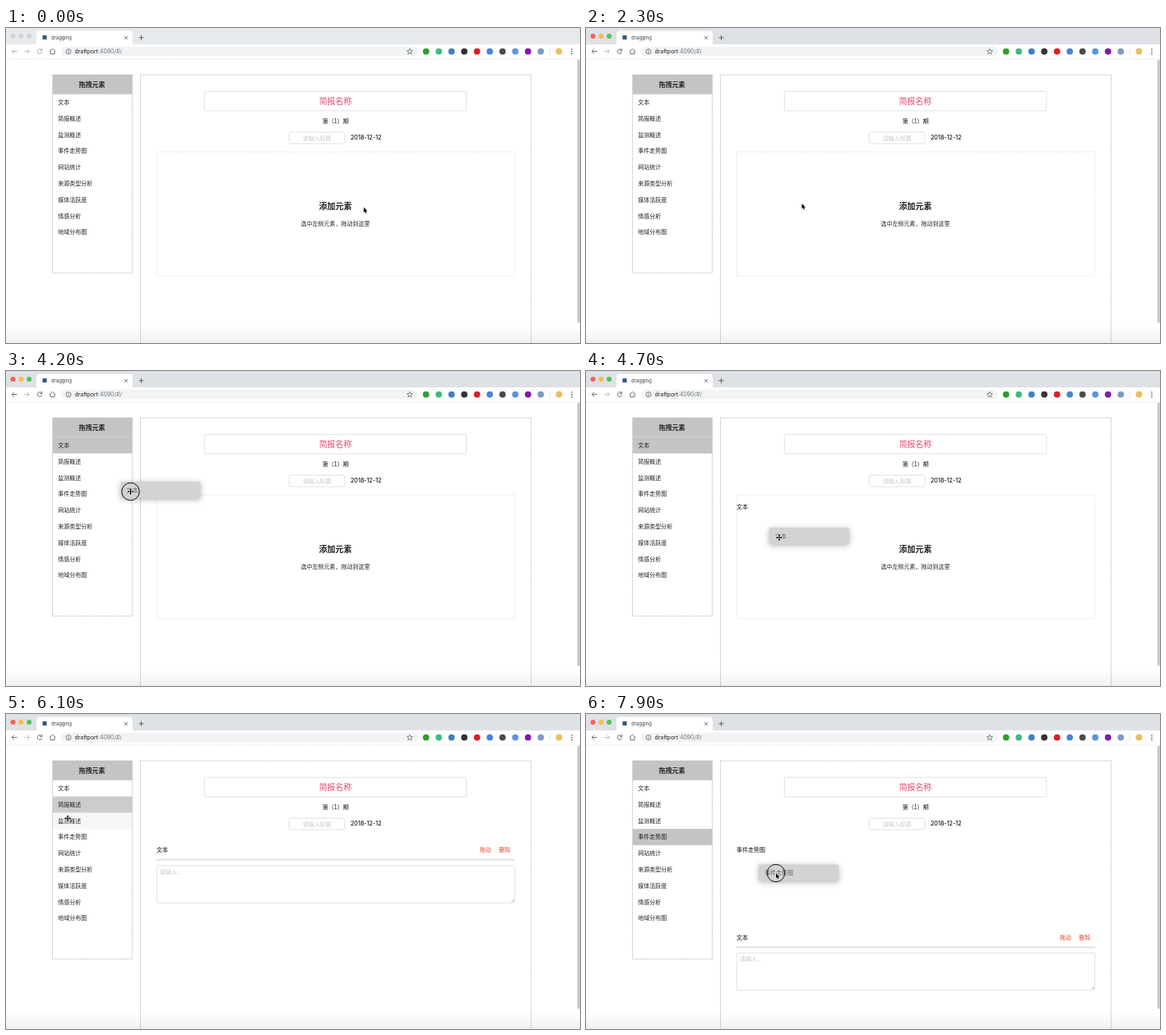
These frames come from a looping animation (698 px wide and 384 px high, 8 s). An HTML page with a canvas:

```html
<!DOCTYPE html>
<html lang="zh-CN">
<head>
<meta charset="utf-8">
<title>dragging</title>
<style>
  html, body { margin: 0; width: 100%; height: 100%; overflow: hidden; background: #fff; }
  canvas { display: block; width: 698px; height: 384px; }
</style>
</head>
<body>
<canvas id="stage"></canvas>
<script>
const W = 698, H = 384, LOOP = 8000, STEP = 100;
const LATIN = 'Inter, sans-serif';
const HAN = '"Noto Sans CJK SC", "Noto Sans CJK", sans-serif';
const GREY = '#c4c4c4', INK = '#5f6368', EDGE = '#b9b9b9', FIELD = '#dedede';
const ROWS = ['文本', '简报概述', '监测概述', '事件走势图', '网站统计',
  '来源类型分析', '媒体活跃度', '情感分析', '地域分布图'];
const ROW_TOP = 80.7, ROW_H = 19.8;

const FOCUS = 1400, DROP = 4900, INSERT = 7800, SHIFT = 106.5;
const ENTER = [3300, 5150, 6050, 6250];  // when each row is hovered
const FADE = 350;
const HELD = [[1300, 2300], [3600, 4600], [7100, LOOP]];

// Pointer moves: from, to, x, y, lift
const HOME = { x: 435, y: 218.5 };
const MOVES = [
  [0, 200, 68, 94], [400, 850, 440, 172], [850, 1300, 72, 92],
  [FOCUS, 2100, 262.5, 214], [2400, 2800, 21, 74], [2800, 3100, 66, 80],
  [3200, 3300, 68, 91], [3700, 4700, 235, 203], [4800, 5000, 62, 90],
  [5000, 5300, 64, 108.7], [5300, 5900, 74, 116], [6000, 6300, 77, 150],
  [7400, 7900, 231, 194, 60]
];

const canvas = document.getElementById('stage');
const ctx = canvas.getContext('2d');
const ratio = window.devicePixelRatio || 1;
canvas.width = W * ratio;
canvas.height = H * ratio;

const clamp = v => Math.max(0, Math.min(1, v));
const within = (t, a, b) => t >= a && t < b;

function pointerAt(t) {
  let { x, y } = HOME;
  for (const [from, to, toX, toY, lift = 0] of MOVES) {
    const p = clamp((t - from) / (to - from));
    x += (toX - x) * p;
    y += (toY - y) * p - lift * Math.sin(Math.PI * p);
  }
  return { x, y };
}

function rect(x, y, w, h, color) {
  ctx.fillStyle = color;
  ctx.fillRect(x, y, w, h);
}

function roundBox(x, y, w, h, r, fill, stroke) {
  ctx.beginPath();
  ctx.roundRect(x, y, w, h, r);
  if (fill) { ctx.fillStyle = fill; ctx.fill(); }
  if (stroke) { ctx.strokeStyle = stroke; ctx.lineWidth = 0.9; ctx.stroke(); }
}

function dashedBox(x, y, w, h, color) {
  ctx.setLineDash([1.5, 0.9]);
  roundBox(x, y, w, h, 0, null, color);
  ctx.setLineDash([]);
}

function disc(x, y, r, color) {
  ctx.beginPath();
  ctx.arc(x, y, r, 0, Math.PI * 2);
  ctx.fillStyle = color;
  ctx.fill();
}

function ring(x, y, r, color, width, from = 0, to = Math.PI * 2) {
  ctx.beginPath();
  ctx.arc(x, y, r, from, to);
  ctx.strokeStyle = color;
  ctx.lineWidth = width;
  ctx.stroke();
}

function line(color, width, ...pts) {
  ctx.beginPath();
  pts.forEach(([x, y]) => ctx.lineTo(x, y));
  ctx.strokeStyle = color;
  ctx.lineWidth = width;
  ctx.stroke();
}

// y is the visual middle of the glyphs
function text(str, x, y, size, color, { align = 'left', weight = 400, family = HAN } = {}) {
  ctx.font = `${weight} ${size}px ${family}`;
  ctx.textAlign = align;
  ctx.fillStyle = color;
  ctx.fillText(str, x, y + size * 0.37);
}

function drawTabs(focused) {
  const lights = focused ? ['#f2625a', '#f5bd45', '#4fc455'] : Array(3).fill('#d0d3d6');
  rect(0, 0, W, 20, focused ? '#dee1e6' : '#e7eaed');
  lights.forEach((c, i) => disc(8.5 + i * 9.8, 10, 3, c));
  roundBox(37, 3.5, 117, 20, 4, '#fff');
  rect(44.5, 9, 5, 5, '#35577d');
  text('dragging', 55, 11.8, 5.9, '#3c4043', { family: LATIN });
  line(INK, 0.9, [144, 9.8], [148, 13.8]);
  line(INK, 0.9, [148, 9.8], [144, 13.8]);
  line(INK, 1, [161.5, 11.8], [167.5, 11.8]);
  line(INK, 1, [164.5, 8.8], [164.5, 14.8]);
}

function drawNavArrow(x, dir, color) {
  line(color, 0.9, [x - dir * 3.2, 28.5], [x + dir * 3.2, 28.5]);
  line(color, 0.9, [x + dir * 0.3, 25.6], [x + dir * 3.2, 28.5], [x + dir * 0.3, 31.4]);
}

function drawToolbar(focused) {
  const ink = focused ? INK : '#a5a8ac';
  rect(0, 20, W, 18, '#fff');
  drawNavArrow(10.3, -1, ink);
  drawNavArrow(25.2, 1, '#b9bcc0');
  ring(41, 28.5, 2.8, ink, 0.9, 0.3, 5.5);
  line(ink, 1, [43.7, 25.2], [43.7, 27.6], [41.3, 27.6]);
  line(INK, 0.9, [52.8, 28.6], [56.5, 25.3], [60.2, 28.6]);
  line(INK, 0.9, [54, 28], [54, 31.6], [59, 31.6], [59, 28]);

  roundBox(67, 22.7, 434, 11.8, 5.9, '#f1f3f4');
  ring(76, 28.7, 3, INK, 0.8);
  line(INK, 0.8, [76, 28.2], [76, 30.4]);
  line(INK, 0.8, [76, 26.8], [76, 27.6]);
  const host = 'draftport';
  text(host, 83.5, 28.6, 6.9, '#202124', { family: LATIN });
  text(':4090/#/', 83.5 + ctx.measureText(host).width, 28.6, 6.9, '#70757a', { family: LATIN });
  const star = Array.from({ length: 11 }, (_, i) => {
    const a = i * Math.PI / 5 - Math.PI / 2, r = i % 2 ? 1.6 : 3.7;
    return [491 + r * Math.cos(a), 28.8 + r * Math.sin(a)];
  });
  line(INK, 0.7, ...star);

  const badges = ['#2f9e2f', '#41b883', '#3f7fc4', '#333', '#d8202c',
    '#4a83d8', '#4b4b4b', '#5b93e0', '#8517a8', '#7d9cbd'];
  badges.forEach((c, i) => disc(510.8 + i * 15.5, 28.6, 3.9, c));
  line('#d8dade', 0.7, [661.3, 24], [661.3, 33]);
  disc(672.5, 28.6, 4, '#e9bf62');
  for (let i = -1; i <= 1; i++) disc(688, 28.6 + i * 2.8, 0.85, INK);
  ctx.setLineDash([2, 1]);
  line('#dcdcdc', 0.8, [0, 38], [W, 38]);
  ctx.setLineDash([]);
}

function rowLevel(row, t) {
  const from = ENTER[row] ?? LOOP;
  const to = row === 0 ? DROP : ENTER[row + 1] ?? LOOP;
  const rise = clamp((Math.min(t, to) - from) / FADE);
  return clamp(rise - Math.max(0, t - to) / FADE);
}

function drawSidebar(t) {
  rect(57, 57, 96.5, 23.7, GREY);
  text('拖拽元素', 104.5, 69.2, 8, '#222', { align: 'center', weight: 700 });
  ROWS.forEach((name, i) => {
    const y = ROW_TOP + i * ROW_H;
    ctx.globalAlpha = rowLevel(i, t);
    rect(57, y, 96.5, ROW_H, GREY);
    ctx.globalAlpha = 1;
    text(name, 63.3, y + 9.8, 7, '#222');
  });
  dashedBox(56.5, 57, 97, 241.8, EDGE);
}

function drawCard(y) {
  text(ROWS[0], 183, y + 14.5, 7, '#111');
  text('拖动', 576, y + 14.5, 7, '#ea452e');
  text('删除', 599.6, y + 14.5, 7, '#ea452e');
  line('#cacaca', 1, [183, y + 26.8], [619, y + 26.8]);
  roundBox(183.3, y + 33.8, 435.4, 45.4, 1.8, '#fff', FIELD);
  text('请输入...', 187, y + 41, 7, '#c3c3c3');
  for (const d of [1.5, 3.5]) line('#888', 0.6, [618 - d, y + 78], [618, y + 78 - d]);
}

function drawReport(t) {
  const center = { align: 'center' };
  dashedBox(163.5, 57, 475.2, 400, EDGE);
  roundBox(241.3, 77.3, 318.6, 23.6, 1.2, null, FIELD);
  text('简报名称', 400.5, 89.2, 9.9, '#dc4a70', center);
  text('第（1）期', 400.7, 113.6, 7, '#111', center);
  roundBox(344.4, 127, 67.6, 14, 1.6, null, FIELD);
  text('请输入标题', 378.3, 134, 7, '#c8c8c8', center);
  text('2018-12-12', 419, 133.6, 7.1, '#111', { family: LATIN, weight: 500 });

  if (t < DROP) {
    dashedBox(183.3, 151, 435.4, 151, '#e2e2e2');
    text('添加元素', 400.5, 217, 10, '#222', { align: 'center', weight: 700 });
    text('选中左侧元素，拖动到这里', 400.5, 238.4, 7, '#222', center);
    if (t >= 4400) text(ROWS[0], 183, 165.5, 7, '#111');
    return;
  }
  if (t >= INSERT) text(ROWS[3], 183, 165.5, 7, '#111');
  ctx.globalAlpha = clamp((t - DROP + 50) / 250);
  drawCard(t >= INSERT ? 151 + SHIFT : 151);
  ctx.globalAlpha = 1;
}

function drawGhost(label, x, y) {
  ctx.save();
  ctx.shadowColor = 'rgba(0,0,0,.3)';
  ctx.shadowBlur = 7 * ratio;
  ctx.shadowOffsetY = 1.5 * ratio;
  roundBox(x, y, 97, 20, 1, '#d3d3d3');
  ctx.restore();
  text(label, x + 7, y + 10, 7, '#666');
}

function fillShape(pts) {
  ctx.beginPath();
  pts.forEach(([x, y]) => ctx.lineTo(x, y));
  ctx.closePath();
  ctx.strokeStyle = '#fff';
  ctx.lineWidth = 1.1;
  ctx.lineJoin = 'round';
  ctx.stroke();
  ctx.fillStyle = '#000';
  ctx.fill();
}

function drawArrow() {
  fillShape([[0, 0], [0, 6.5], [1.4, 5.1], [2.4, 7.5], [3.5, 7], [2.5, 4.8], [4.5, 4.7]]);
}

function drawMove() {
  const arm = [[-0.5, -0.5], [-0.5, -2.2], [-1.6, -2.2], [0, -4], [1.6, -2.2], [0.5, -2.2]];
  const turn = ([x, y], q) => [[x, y], [-y, x], [-x, -y], [y, -x]][q];
  fillShape([0, 1, 2, 3].flatMap(q => arm.map(p => turn(p, q))));
}

function drawPointer(t, { x, y }) {
  const crossed = within(t, 3300, 4800) || within(t, 5000, 7400);
  if (HELD.some(([a, b]) => within(t, a, b))) {
    ring(x, y, within(t, 7100, 7400) ? 9 : 10.7, '#111', 1);
  }
  ctx.save();
  ctx.translate(x, y);
  if (crossed) drawMove();
  else drawArrow();
  ctx.restore();
}

function drawEdges() {
  const shade = ctx.createLinearGradient(0, 363, 0, H);
  shade.addColorStop(0, 'rgba(0,0,0,0)');
  shade.addColorStop(1, 'rgba(0,0,0,.06)');
  rect(0, 363, W, 21, shade);
  roundBox(694.8, 38.5, 3, 321, 1.5, '#c6c6c6');
}

function draw(t) {
  ctx.setTransform(ratio, 0, 0, ratio, 0, 0);
  rect(0, 0, W, H, '#fff');
  drawTabs(t >= FOCUS);
  drawToolbar(t >= FOCUS);
  drawReport(t);
  drawSidebar(t);
  drawEdges();
  const p = pointerAt(t);
  if (within(t, 3800, 4800)) drawGhost(ROWS[0], p.x - 12, p.y - 12);
  if (t >= 7500) drawGhost(ROWS[3], p.x - 21, p.y - 10.5);
  drawPointer(t, p);
}

const start = performance.now();
function tick() {
  const t = (performance.now() - start) % LOOP;
  draw(Math.floor(t / STEP) * STEP);
  requestAnimationFrame(tick);
}
tick();
</script>
</body>
</html>
```
